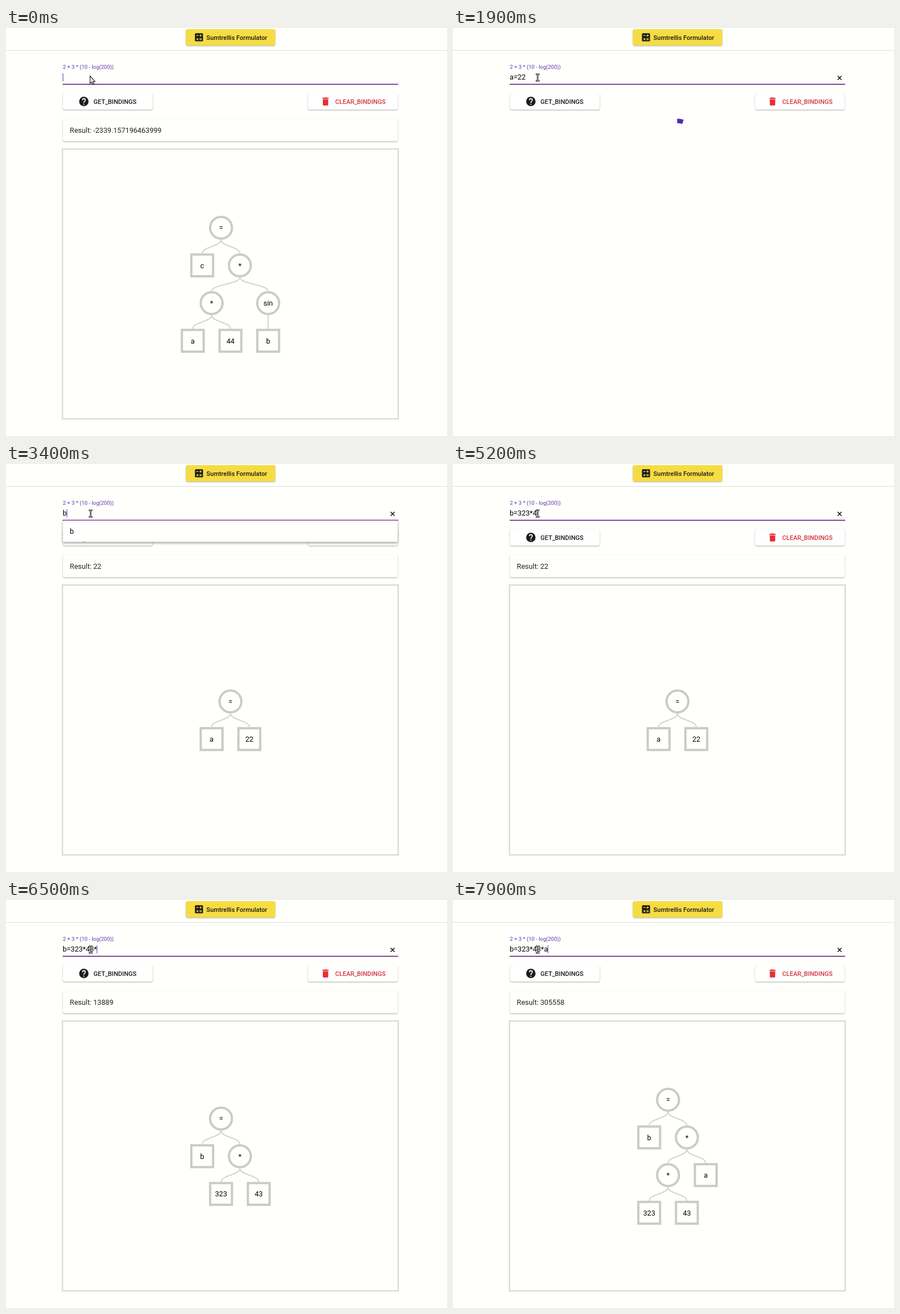
An HTML page that plays this animation: 778 by 720 pixels, repeating every 8 s.

```html
<!DOCTYPE html>
<html lang="en">
<head>
<meta charset="utf-8">
<title>Expression tree</title>
<style>
  html, body { margin: 0; width: 100%; height: 100%; overflow: hidden; background: #fffffc; }
  svg { display: block; font: 12.65px Roboto, sans-serif; }
  text { white-space: pre; fill: #000; }
  .label { font-size: 9.5px; fill: #5e35b1; }
  .button { font-size: 11.06px; font-weight: 500; fill: #1c1c1c; }
  .raised { filter: drop-shadow(0 1px 1px #0005); }
  .floating { filter: drop-shadow(0 2px 2px #0006); }
  .node { fill: #fffffc; stroke: #c9cbc8; stroke-width: 4; }
  .edge { fill: none; stroke: #c9cbc8; stroke-width: 1.6; }
  .tree text { text-anchor: middle; }
</style>
</head>
<body>
<svg width="778" height="720" viewBox="0 0 778 720">
  <path d="M0 39.5H778" stroke="#dcdcda"/>
  <rect class="raised" x="317.5" y="2" width="157.5" height="28.8" rx="3" fill="#f6dc43"/>
  <g transform="translate(331 7) scale(.79)">
    <rect x="3" y="3" width="18" height="18" rx="2" fill="#1c1c1c"/>
    <path d="M6 8h5M13 8h5M15.5 5.500v5M6.700 14.200l3.600 3.600m0-3.600l-3.600 3.600M13 14.700h5M13 17.300h5" stroke="#f6dc43" stroke-width="1.500"/>
  </g>
  <text class="button" x="353.600" y="20.700">Sumtrellis Formulator</text>

  <text class="label" x="100.300" y="72.200">2 + 3 * (10 - log(200))</text>
  <rect id="selection" x="100" y="79" width="29" height="16" fill="#3584e4"/>
  <text id="input" x="100" y="91.300"></text>
  <rect id="caret" y="80" width="1" height="14" fill="#5e35b1"/>
  <path d="M100 99.300H691.800" stroke="#642c8c" stroke-width="1.800"/>
  <path id="clear" d="M678.500 84.500l7 7m0-7l-7 7" stroke="#111" stroke-width="1.500"/>

  <g class="raised" fill="#fff">
    <rect x="100.300" y="115" width="158.500" height="29" rx="3"/>
    <rect x="533" y="115" width="158" height="29" rx="3"/>
  </g>
  <path transform="translate(127.400 119.700) scale(.83)" fill="#1c1c1c" fill-rule="evenodd" d="M12 2a10 10 0 1 0 0 20a10 10 0 1 0 0-20ZM13 19H11V17H13ZM15.070 11.250L14.170 12.170C13.450 12.890 13 13.500 13 15H11V14.500C11 13.390 11.450 12.390 12.170 11.670L13.410 10.410C13.780 10.050 14 9.550 14 9A2 2 0 0 0 10 9H8A4 4 0 0 1 16 9C16 9.880 15.640 10.670 15.070 11.250Z"/>
  <text class="button" x="154.300" y="133.700">GET_BINDINGS</text>
  <path transform="translate(554.200 120.200) scale(.79)" fill="#e53035" d="M19 4H15.500L14.500 3H9.500L8.500 4H5V6H19ZM6 19A2 2 0 0 0 8 21H16A2 2 0 0 0 18 19V7H6Z"/>
  <text class="button" x="580.700" y="133.700" style="fill:#d0343f">CLEAR_BINDINGS</text>

  <g id="output">
    <rect class="raised" x="100.300" y="160" width="590.700" height="40" rx="3" fill="#fffffd"/>
    <text id="result" x="112.600" y="184.500" style="fill:#222"></text>
    <rect x="99.600" y="213.500" width="592.300" height="476.300" fill="none" stroke="#d7d9d6" stroke-width="2.200"/>
    <g id="tree" class="tree"></g>
  </g>
  <path id="spinner" d="M395.500 164A36 36 0 0 1 405.700 165.500" fill="none" stroke="#512da8" stroke-width="8"/>

  <g id="menu">
    <rect class="floating" x="100.300" y="99.800" width="590.700" height="37.700" rx="2" fill="#fffffd"/>
    <text id="option" x="112.600" y="122.700"></text>
  </g>
  <path id="arrow" d="M148.300 84.800V97.800L151.200 95.200L153.200 99.700L155.300 98.800L153.300 94.500H157Z" fill="#fff" stroke="#111" stroke-width="1.100"/>
  <g id="beam" fill="none">
    <path d="M146 81.500Q149.300 81.500 149.300 83.500V91.500Q149.300 93.500 146 93.500M152.600 81.500Q149.300 81.500 149.300 83.500M149.300 91.500Q149.300 93.500 152.600 93.500" stroke="#111" stroke-width="2.600"/>
    <path d="M146.500 81.500Q149.300 81.500 149.300 83.500V91.500Q149.300 93.500 146.500 93.500M152.100 81.500Q149.300 81.500 149.300 83.500M149.300 91.500Q149.300 93.500 152.100 93.500" stroke="#fff" stroke-width=".8"/>
  </g>
</svg>
<script>
const $ = id => document.getElementById(id);
const LOOP = 8000, STEP = 66.5;

// A node is [label, column in quarter steps from the centre, ...children].
const views = {
  product: { result: '-2339.157196463999', levels: 4, root:
    ['=', -1, ['c', -3], ['*', 1, ['*', -2, ['a', -4], ['44', 0]], ['sin', 4, ['b', 4]]]] },
  number: { result: '22', levels: 2, root: ['=', 0, ['a', -2], ['22', 2]] },
  pair: { result: '13889', levels: 3, root:
    ['=', -1, ['b', -3], ['*', 1, ['323', -1], ['43', 3]]] },
  triple: { result: '305558', levels: 4, root:
    ['=', -1, ['b', -3], ['*', 1, ['*', -1, ['323', -3], ['43', 1]], ['a', 3]]] }
};

// Each entry changes some of the state from its time on.
const timeline = [
  [0, { text: '', caret: true, view: 'product', menu: 0, selected: false }],
  [200, { text: 'a', menu: .5 }],
  [300, { menu: 1 }],
  [600, { text: 'a=', menu: 0 }],
  [1000, { text: 'a=2' }],
  [1100, { text: 'a=22' }],
  [1700, { caret: false }],
  [1900, { view: null }],
  [2300, { view: 'number', caret: true }],
  [2600, { selected: true, caret: false }],
  [3400, { text: 'b', selected: false, caret: true, menu: 1 }],
  [3800, { text: 'b=', menu: 0 }],
  [4100, { text: 'b=32' }],
  [4200, { text: 'b=323' }],
  [4800, { text: 'b=323*' }],
  [5200, { text: 'b=323*4' }],
  [5500, { text: 'b=323*43' }],
  [5900, { caret: false }],
  [6100, { view: null }],
  [6500, { view: 'pair', text: 'b=323*43*', caret: true }],
  [6700, { text: 'b=323*43*a' }],
  [7300, { caret: false }],
  [7500, { view: null }],
  [7900, { view: 'triple', caret: true }]
];

function drawNode([label, column, ...children], y) {
  const x = 396 + column * STEP / 4;
  const edges = children.map(child => {
    const endX = 396 + child[1] * STEP / 4, top = y + 21, end = y + STEP - 21, mid = (top + end) / 2;
    return `<path class="edge" d="M${x} ${top}C${x} ${mid} ${endX} ${mid} ${endX} ${end}"/>`;
  });
  const shape = children.length
    ? `<circle class="node" cx="${x}" cy="${y}" r="19.3"/>`
    : `<rect class="node" x="${x - 19.2}" y="${y - 19.2}" width="38.4" height="38.4"/>`;
  return edges.join('') + shape + `<text x="${x}" y="${y + 4.7}">${label}</text>` +
    children.map(child => drawNode(child, y + STEP)).join('');
}

const show = (id, opacity) => $(id).style.opacity = Number(opacity);

function render({ text, caret, view, menu, selected }) {
  $('input').textContent = text;
  $('input').style.fill = selected ? '#fff' : '#000';
  $('caret').setAttribute('x', Math.round(100 + $('input').getComputedTextLength()));
  $('option').textContent = text;
  show('caret', caret);
  show('selection', selected);
  show('menu', menu);
  show('clear', text);
  $('clear').style.opacity = text ? 1 : 0;
  show('arrow', !text);
  show('beam', text !== '');
  show('output', view !== null);
  show('spinner', view === null);
  if (view) {
    const { result, levels, root } = views[view];
    $('result').textContent = 'Result: ' + result;
    $('tree').innerHTML = drawNode(root, 452.2 - STEP * (levels - 1) / 2);
  }
}

let current = -1;
function tick(now) {
  const time = now % LOOP;
  const index = timeline.findLastIndex(([start]) => start <= time);
  if (index !== current) {
    current = index;
    render(Object.assign({}, ...timeline.slice(0, index + 1).map(entry => entry[1])));
  }
  requestAnimationFrame(tick);
}
tick(0);
</script>
</body>
</html>
```
